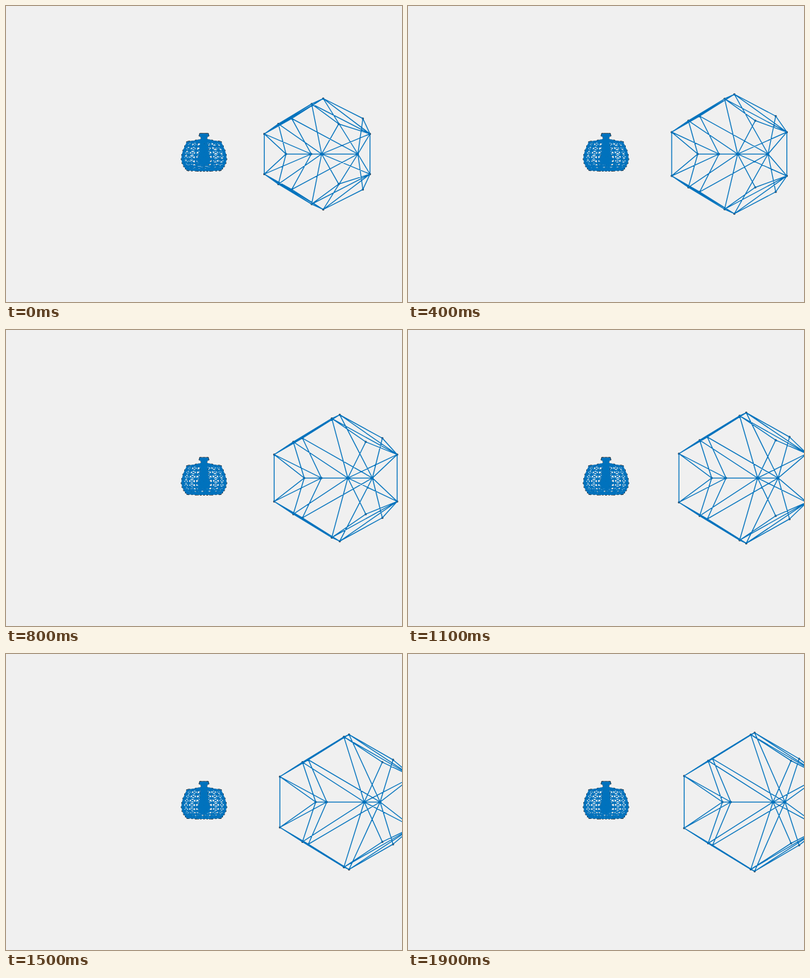
Write an HTML page that moves like this. It is 560 px wide and 420 px high and loops after 2000 ms.

```html
<!DOCTYPE html>
<html>
<head>
<meta charset="utf-8">
<style>
html, body { margin: 0; width: 100%; height: 100%; overflow: hidden; background: #f0f0f0; }
svg { display: block; width: 560px; height: 420px; }
path { fill: none; stroke-linecap: round; stroke-linejoin: round; }
.dots { stroke: #30343a; stroke-width: 3; }
.lines { stroke: #0072bd; stroke-width: 1.25; }
</style>
</head>
<body>
<svg viewBox="0 0 560 420">
  <path class="dots" id="potDots"/><path class="lines" id="potLines"/>
  <path class="dots" id="solidDots"/><path class="lines" id="solidLines"/>
</svg>
<script>
const STEPS = 20, STEP_MS = 100;
const PX = 56, CX = 280, CY = 210;
const PHI = (1 + Math.sqrt(5)) / 2;

// Dodecahedron of radius 2 centred at (4, 0, 4), faces split into triangles.
function makeSolid() {
  const a = 2 / Math.sqrt(3), pts = [], edges = [], id = {};
  const add = (name, x, y, z) => {
    id[name] = pts.length;
    pts.push([4 + a * x, a * y, 4 + a * z]);
  };
  const base = {
    A: [-PHI, 1 / PHI, 0], G: [PHI, 1 / PHI, 0],
    B: [-1, 1, 1], C: [-1, 1, -1], H: [1, 1, 1], F: [1, 1, -1],
    D: [0, PHI, 1 / PHI], E: [0, PHI, -1 / PHI]
  };
  for (const [n, [x, y, z]] of Object.entries(base)) {
    add(n + 0, x, y, z);
    add(n + 1, x, -y, z);
  }
  add('P', -1 / PHI, 0, PHI);
  add('Q', -1 / PHI, 0, -PHI);
  add('R', 1 / PHI, 0, PHI);
  add('S', 1 / PHI, 0, -PHI);
  const at = (n, side) => id[n] ?? id[n + side];
  const mirrored = 'AB AC AD AE AP AQ BD BP BR CE CQ CS DE DH DR DG EF ES EG FG FS HG HR GR GS';
  for (const [m, n] of mirrored.split(' '))
    for (const side of [0, 1]) edges.push([at(m, side), at(n, side)]);
  for (const [m, n] of [['A0', 'A1'], ['G0', 'G1'], ['P', 'R'], ['Q', 'S']])
    edges.push([id[m], id[n]]);
  return { pts, edges };
}

// Teapot seen along its spout.
function makePot() {
  const K = 0.3, pts = [], edges = [];
  // Rings of n points joined by rows, columns and one diagonal per cell.
  function mesh(rings, n, place) {
    const start = pts.length;
    for (let i = 0; i < rings; i++)
      for (let j = 0; j < n; j++) {
        const [x, y, z] = place(i, j / n * 2 * Math.PI);
        pts.push([K * x, K * (y - 1.4), K * z]);
        const p = start + i * n + j, next = start + i * n + (j + 1) % n;
        edges.push([p, next]);
        if (i) edges.push([p, p - n], [next, p - n]);
      }
  }
  const profile = [
    [0, 3.1], [0.33, 3.08], [0.36, 2.96], [0.2, 2.8], [0.2, 2.65], [0.7, 2.52],
    [1.3, 2.42], [1.42, 2.4], [1.58, 2.05], [1.73, 1.7], [1.83, 1.33],
    [1.87, 0.97], [1.8, 0.64], [1.67, 0.38], [1.52, 0.18], [1.4, 0.06], [0.7, 0.02]
  ];
  mesh(profile.length, 16, (i, t) => {
    const [r, y] = profile[i];
    return [r * Math.cos(t), y, r * Math.sin(t)];
  });
  // Spout towards the viewer.
  mesh(9, 8, (i, t) => {
    const u = i / 8, r = 0.5 - 0.26 * u;
    return [r * Math.cos(t), 0.95 + 1.4 * u * u + r * Math.sin(t) * (1 - u), -1.6 - 1.4 * u - 0.2 * Math.sin(t) * u];
  });
  // Handle at the back.
  mesh(11, 8, (i, t) => {
    const q = (i / 10 - 0.5) * Math.PI, r = 1 + 0.14 * Math.sin(t);
    return [0.28 * Math.cos(t), 1.45 + 0.72 * r * Math.sin(q), 1.6 + 1.2 * r * Math.cos(q)];
  });
  return { pts, edges };
}

const shapes = { solid: makeSolid(), pot: makePot() };

function draw(step) {
  // The view narrows as the camera retreats, so the plane z = 0 keeps its size.
  const dist = 10 * 5 ** (step / (STEPS - 1));
  for (const [name, { pts, edges }] of Object.entries(shapes)) {
    const flat = pts.map(([x, y, z]) => {
      const s = PX * dist / (dist + z);
      return (CX + x * s).toFixed(2) + ' ' + (CY - y * s).toFixed(2);
    });
    document.getElementById(name + 'Dots').setAttribute('d', flat.map(p => `M${p}h0`).join(''));
    document.getElementById(name + 'Lines').setAttribute('d',
      edges.map(([i, j]) => `M${flat[i]}L${flat[j]}`).join(''));
  }
}

let shown = -1;
function tick() {
  const step = Math.floor(performance.now() / STEP_MS) % STEPS;
  if (step !== shown) draw(shown = step);
  requestAnimationFrame(tick);
}
tick();
</script>
</body>
</html>
```
